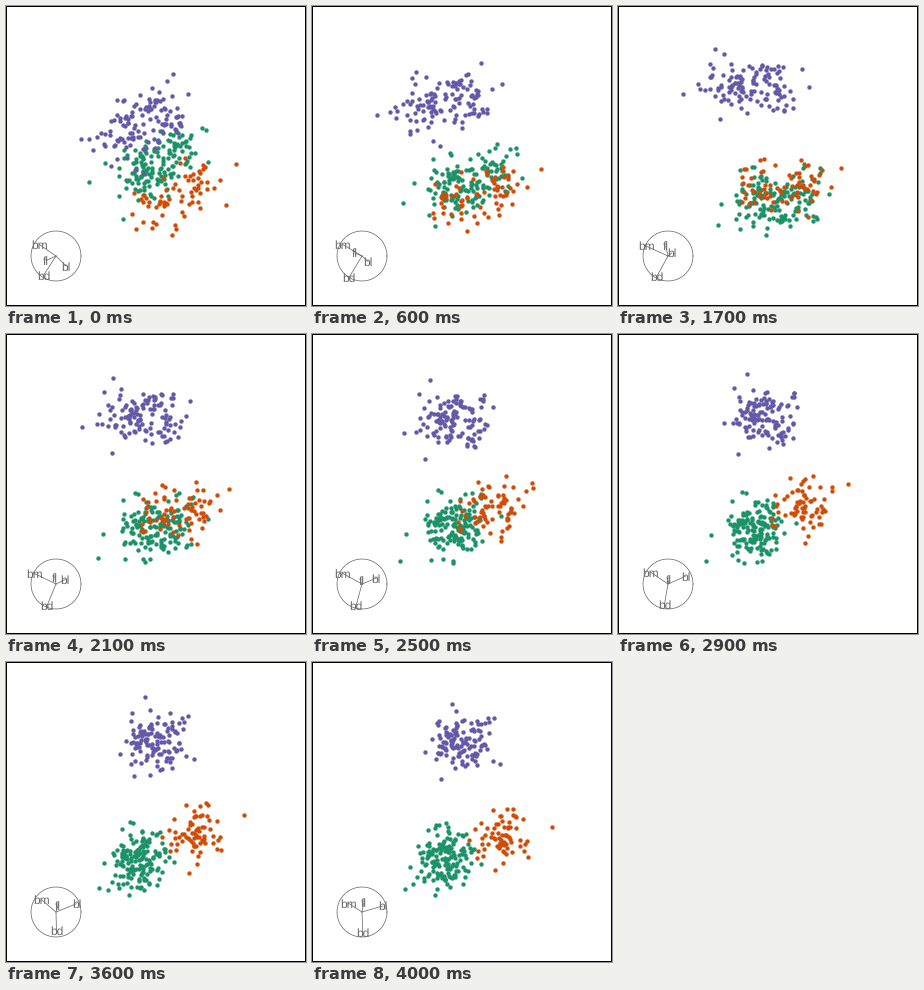
Animation, 300 px wide and 300 px high, one loop 4100 ms. Source, as a matplotlib script:

```python
import numpy as np
import matplotlib.pyplot as plt
from matplotlib.animation import FuncAnimation
from matplotlib.patches import Rectangle

SIZE, FRAMES, STEP_MS = 300, 41, 100
PX = 0.72                      # one pixel in points at 100 dpi
SCALE = 37.5                   # pixels per standard deviation
HUB, RADIUS = np.array([50, 250]), 25
GREY = "#6c6c6c"
LINE = 0.75 * PX
FLIP = np.array([1, -1])       # data y points up, pixel y points down
LABELS = ["bl", "bd", "fl", "bm"]
rng = np.random.default_rng(4)

# The tour turns at these frames; each plane holds the (x, y) direction of every label
TURNS = [0, 14, 25, 34, 40]
PLANES = np.array([
    [(.40, -.40), (-.52, -.80), (-.40, -.20), (-.64, .44)],
    [(-.01, .08), (-.52, -.82), (-.11, .50), (-.86, .37)],
    [(.56, .24), (-.24, -.86), (.00, .12), (-.76, .42)],
    [(.80, .38), (.00, -.71), (.09, .22), (-.56, .53)],
    [(.80, .23), (.04, -.82), (.06, .36), (-.54, .36)],
])


def plane_at(frame):
    """Blend the neighbouring planes and make the result orthonormal again."""
    k = min(np.searchsorted(TURNS, frame, side="right"), len(TURNS) - 1)
    t = (frame - TURNS[k - 1]) / (TURNS[k] - TURNS[k - 1])
    u, _, vt = np.linalg.svd((1 - t) * PLANES[k - 1] + t * PLANES[k],
                             full_matrices=False)
    return u @ vt


def species(count, mean, far_point):
    """Two overlapping sub-clouds, small and large animals, plus one far point."""
    n = count - 1
    sex = np.where(np.arange(n) % 2, 1, -1)[:, None] * [.35, .38, .25, .42]
    size = .14 * rng.standard_normal((n, 1))
    noise = .37 * np.clip(rng.standard_normal((n, 4)), -2.2, 2.2)
    spread = sex + size + noise
    return np.vstack([mean + spread - spread.mean(axis=0), far_point])


GROUPS = [
    ("#1b9268", species(146, (-.95, .60, -.78, -.62), (-1.72, 2.0, -.21, .24))),
    ("#6459a9", species(119, (.65, -1.10, 1.16, 1.10), (.07, .07, 1.29, 1.29))),
    ("#d14d05", species(68, (.88, .64, -.37, -.59), (2.56, .32, -1.42, -.63))),
]

plt.rcParams["font.family"] = "Liberation Sans"
plt.rcParams["text.hinting"] = "none"
fig = plt.figure(figsize=(3, 3), dpi=100, facecolor="white")
ax = fig.add_axes([0, 0, 1, 1])
ax.set(xlim=(0, SIZE), ylim=(SIZE, 0))
ax.axis("off")
ax.add_patch(Rectangle((.5, .5), SIZE - 1, SIZE - 1, fill=False, ec="black",
                       lw=PX, snap=False))

theta = np.linspace(0, 2 * np.pi, 50)
ax.plot(HUB[0] + RADIUS * np.cos(theta), HUB[1] + RADIUS * np.sin(theta),
        color=GREY, lw=LINE)
spokes = [ax.plot([], [], color=GREY, lw=LINE, snap=False)[0] for _ in LABELS]
names = [ax.text(0, 0, s, color=GREY, size=12 * PX, ha="center", va="baseline",
                 zorder=4) for s in LABELS]
dots = [ax.plot([], [], "o", color=colour, ms=4.4 * PX, mew=0, zorder=3, snap=False)[0]
        for colour, _ in GROUPS]


def draw(frame):
    plane = plane_at(frame)
    for (x, y), spoke, name in zip(HUB + RADIUS * plane * FLIP, spokes, names):
        spoke.set_data([HUB[0], x], [HUB[1], y])
        name.set_position((x, y + 4.3))
    for (_, data), dot in zip(GROUPS, dots):
        dot.set_data(*(SIZE / 2 + SCALE * data @ plane * FLIP).T)
    return spokes + names + dots


anim = FuncAnimation(fig, draw, frames=FRAMES, interval=STEP_MS,
                     repeat=True, repeat_delay=0)
plt.show()
```
